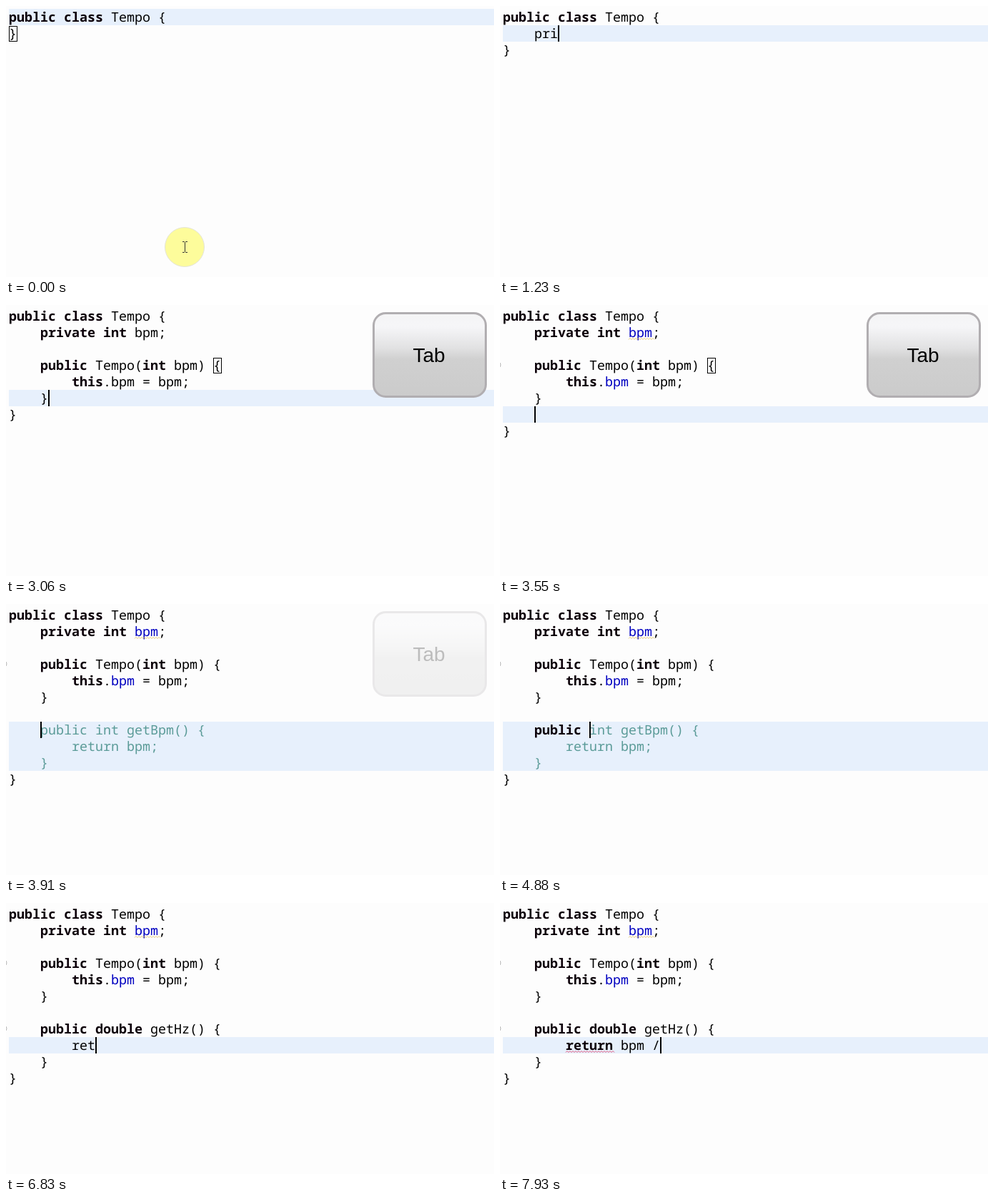
These frames come from a looping animation (683x380 px, 8 s). An HTML page:

```html
<!DOCTYPE html>
<html lang="en">
<head>
<meta charset="utf-8">
<title>Code typing</title>
<style>
  html, body { margin: 0; width: 100%; height: 100%; overflow: hidden; background: #fdfdfd; }
  svg { display: block; width: 100vw; height: 100vh; }
  .code text {
    font: 18.333px "Noto Sans Mono", "DejaVu Sans Mono", monospace;
    white-space: pre;
    text-rendering: geometricPrecision;
    fill: #000;
  }
  .code .kw { font-weight: 700; fill: #0c0009; }
  .code .field { fill: #0000c0; }
  .code .ghost { fill: #5b9b98; }
  .key text { font: 28px "Liberation Sans", Arial, sans-serif; fill: #000; text-anchor: middle; }
</style>
</head>
<body>
<svg viewBox="0 0 683 380" preserveAspectRatio="none">
  <defs>
    <linearGradient id="gloss" x1="0" y1="0" x2="0" y2="1">
      <stop offset="0" stop-color="#f4f4f5"/>
      <stop offset=".16" stop-color="#f6f6f8"/>
      <stop offset=".42" stop-color="#e1e1e2"/>
      <stop offset=".55" stop-color="#d0d0d0"/>
      <stop offset="1" stop-color="#cbcbcb"/>
    </linearGradient>
  </defs>
  <rect width="683" height="380" fill="#fdfdfd"/>
  <g class="code" id="code"></g>
  <g id="mouse">
    <circle cx="250" cy="338" r="27.5" fill="#fdfc9b" stroke="#e4e4d8"/>
    <path d="M247 330.5h2.5l1 1 1-1h2.5M250.500 331.500v13M247 345.500h2.500l1-1 1 1h2.500" fill="none" stroke="#333"/>
  </g>
  <g class="key" id="key">
    <rect x="514.500" y="11.500" width="157" height="117" rx="17" fill="url(#gloss)" stroke="#b1aeb1" stroke-width="3"/>
    <text x="592" y="80">Tab</text>
  </g>
</svg>
<script>
const LOOP = 8000, LEFT = 4, TOP = 4, CHAR = 11, ROW = 23;
const $ = id => document.getElementById(id);
const colX = col => LEFT + CHAR * col;
const rowY = row => TOP + ROW * row;

// [start time, value] steps; the last one reached counts
const at = (steps, t) => steps.reduce((v, [from, next]) => t >= from ? next : v, 0);

const FIELD = 'private int bpm;';
const GETTER = 'public double getHz() {';
const RESULT = 'return bpm /';
const CTOR = ['    public Tempo(int bpm) {', '        this.bpm = bpm;', '    }'];
const GHOST = ['public int getBpm() {', '        return bpm;', '    }'];

const fieldKeys = [[990, 1], [1110, 2], [1230, 3], [1350, 4], [1470, 5], [1720, 7],
  [1840, 9], [1960, 11], [2080, 13], [2200, 15], [2450, 16]];
const getterKeys = [[4400, 1], [4520, 2], [4640, 4], [4760, 6], [4880, 7], [5000, 8], [5120, 9],
  [5240, 11], [5360, 13], [5480, 16], [5730, 18], [5850, 20], [5970, 21], [6090, 23]];
const resultKeys = [[6590, 1], [6710, 2], [6830, 3], [6950, 6], [7320, 7], [7440, 8],
  [7560, 10], [7810, 11], [7930, 12]];
const keyFade = [[3060, 1], [3670, .75], [3790, .5], [3910, .25], [4030, 0]];

const ghost = text => ({ text: '', ghost: text });

function editor(t) {
  const lines = ['public class Tempo {'];
  const s = { lines, caret: null, rows: 1, box: null };
  const put = (row, col) => { s.caret = [row, col]; };

  if (t < 740) {
    put(0, 20);
    s.blink = t < 120 || t >= 490;
    s.box = [1, 0];
  } else {
    const n = at(fieldKeys, t);
    lines.push('    ' + FIELD.slice(0, n));
    put(1, 4 + n);
  }
  if (t >= 2700) {
    lines.push('');
    put(2, 4);
  }
  if (t >= 2820 && t < 3060) {
    lines.push(...CTOR.map(ghost));
    put(3, 4);
    s.rows = 3;
  }
  if (t >= 3060) {
    lines.push(...CTOR);
    put(5, 5);
    if (t < 3670) s.box = [3, 26];
  }
  if (t >= 3550) {
    lines.push('');
    put(6, 4);
  }
  if (t >= 3670) {
    const n = at(getterKeys, t), text = '    ' + GETTER.slice(0, n);
    put(7, 4 + n);
    if (t < 5000) {
      lines.push({ text, ghost: GHOST[0].slice(n) }, ghost(GHOST[1]), ghost(GHOST[2]));
      s.rows = 3;
    } else {
      lines.push(text);
    }
    if (t >= 6090 && t < 6340) s.box = [8, 0];
  }
  if (t >= 6340) {
    const n = at(resultKeys, t);
    lines.push('        ' + RESULT.slice(0, n), '    }');
    put(8, 8 + n);
  }
  lines.push('}');
  return s;
}

function paint(text, row, resolved) {
  let out = text.replace(/\b(public|class|private|int|double|this|return)\b/g, '<tspan class="kw">$1</tspan>');
  if (resolved && (row === 1 || row === 4)) out = out.replace('bpm', '<tspan class="field">bpm</tspan>');
  return out;
}

function lineText(line, row, resolved) {
  const { text, ghost = '' } = line.text === undefined ? { text: line } : line;
  const full = text + ghost, indent = full.search(/\S/);
  if (indent < 0) return '';
  const own = paint(text.slice(indent), row, resolved);
  const hint = ghost.slice(Math.max(0, indent - text.length));
  return `<text x="${colX(indent)}" y="${rowY(row) + 18}">${own}<tspan class="ghost">${hint}</tspan></text>`;
}

function squiggle(row, col, count, color) {
  let d = `M${colX(col)} ${rowY(row) + 21.5}`;
  for (let i = 0; i < count * CHAR / 4; i++) d += 'l2 -2l2 2';
  return `<path d="${d}" fill="none" stroke="${color}"/>`;
}

const fold = row => `<circle cx="-3" cy="${rowY(row) + 11}" r="4" fill="none" stroke="#b4b4b4"/>`;

function draw(t) {
  const s = editor(t), [row, col] = s.caret, resolved = t >= 3180;
  let out = `<rect x="4" y="${rowY(row)}" width="679" height="${ROW * s.rows}" fill="#e7f0fc"/>`;
  out += s.lines.map((line, i) => lineText(line, i, resolved)).join('');
  if (resolved) out += squiggle(1, 16, 3, '#e3c878');
  if (t >= 7320) out += squiggle(8, 8, 6, '#e0557c');
  if (t >= 3300) out += fold(3);
  if (t >= 6590) out += fold(7);
  if (s.box) {
    const [r, c] = s.box;
    out += `<rect x="${colX(c) + .5}" y="${rowY(r) + 1.5}" width="11" height="21" fill="none" stroke="#000"/>`;
  }
  if (!s.blink) out += `<rect x="${colX(col)}" y="${rowY(row)}" width="2" height="${ROW}"/>`;
  $('code').innerHTML = out;
  $('mouse').style.display = t < 740 ? '' : 'none';
  $('key').style.opacity = at(keyFade, t);
}

let start;
function tick(now) {
  start ??= now;
  draw((now - start) % LOOP);
  requestAnimationFrame(tick);
}
draw(0);
requestAnimationFrame(tick);
</script>
</body>
</html>
```
